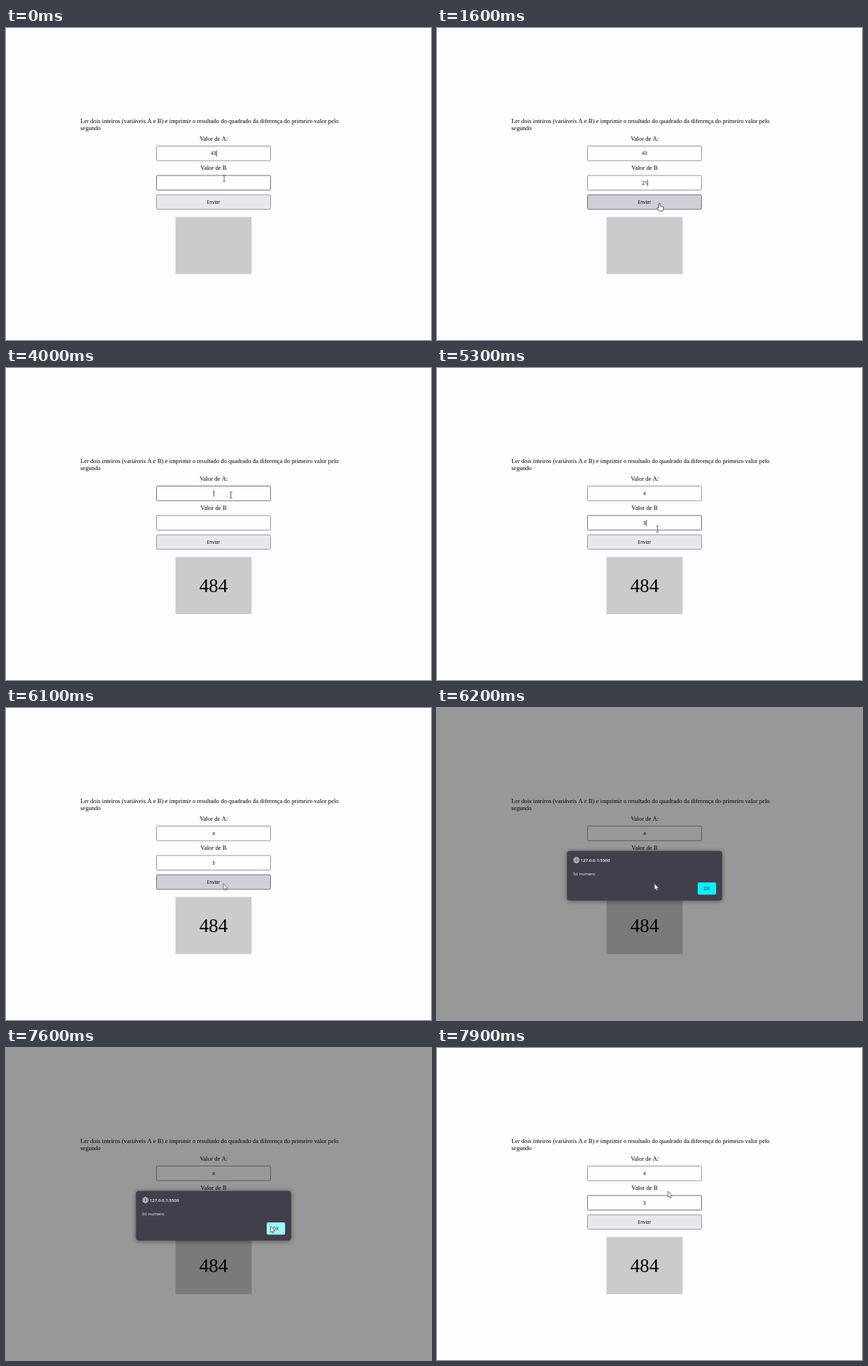
An HTML page with a canvas that plays this animation: 600 by 440 pixels, repeating every 8000 ms.

```html
<!DOCTYPE html>
<html lang="pt-BR">
<head>
<meta charset="utf-8">
<title>Quadrado da diferença</title>
<style>
html, body { margin: 0; width: 100%; height: 100%; overflow: hidden; background: #fdfcfe; }
canvas { display: block; width: 600px; height: 440px; }
</style>
</head>
<body>
<canvas id="stage" width="600" height="440"></canvas>
<script>
const ctx = document.getElementById('stage').getContext('2d');
const LOOP = 8000, STEP = 100;
const SERIF = '"Liberation Serif", serif';
const SANS = '"Open Sans", sans-serif';
const FIELD_A = 166, FIELD_B = 207.5, BUTTON = 234.7;

// Pointer stops: time, x, y
const path = [
  [0, 308, 212], [300, 311, 214], [800, 314, 219], [1100, 314, 219],
  [1400, 316, 257], [1600, 314, 247], [2800, 314, 247], [3300, 316, 214],
  [3500, 316, 214], [4000, 317.5, 179], [4400, 317.5, 179], [5000, 312, 219],
  [5200, 312, 219], [5500, 309, 250], [5700, 309, 248], [6000, 309, 248],
  [6100, 307, 247.7], [6600, 307, 247.7], [7500, 373.5, 251.5],
  [7600, 373.5, 251.5], [7900, 326, 202]
];

const within = (t, a, b) => t >= a && t < b;

// Last value whose start time has passed
function at(t, steps) {
  let value = '';
  for (const [start, v] of steps) if (t >= start) value = v;
  return value;
}

function pointer(t) {
  const i = path.findIndex(p => p[0] > t);
  if (i < 0) return path[path.length - 1].slice(1);
  const [t0, x0, y0] = path[i - 1], [t1, x1, y1] = path[i];
  const k = (t - t0) / (t1 - t0), e = k * k * (3 - 2 * k);
  return [x0 + (x1 - x0) * e, y0 + (y1 - y0) * e];
}

function text(str, x, y, size, family, color = '#000', align = 'center', weight = 400) {
  ctx.font = `${weight} ${size}px ${family}`;
  ctx.fillStyle = color;
  ctx.textAlign = align;
  ctx.fillText(str, x, y);
}

function box(x, y, w, h, r, fill, stroke) {
  ctx.beginPath();
  ctx.roundRect(x, y, w, h, r);
  ctx.fillStyle = fill;
  ctx.fill();
  if (stroke) {
    ctx.strokeStyle = stroke;
    ctx.lineWidth = 1;
    ctx.stroke();
  }
}

function control(y, fill, hover, radius) {
  box(212.5, y + .5, 161, 20.6, radius, fill, hover ? '#70707b' : '#9696a2');
}

function field(y, value, hover, caret) {
  control(y, '#fefeff', hover, 1);
  text(value, 293, y + 13.3, 6.7, SANS);
  if (caret) {
    const x = 293 + (value ? ctx.measureText(value).width / 2 : 0);
    ctx.fillStyle = '#222';
    ctx.fillRect(x, y + 6.4, .8, 9);
  }
}

function page(t, hover) {
  ctx.fillStyle = '#fdfcfe';
  ctx.fillRect(0, 0, 600, 440);
  text('Ler dois inteiros (variáveis A e B) e imprimir o resultado do quadrado da diferença do primeiro valor pelo',
    105, 133.8, 8.6, SERIF, '#000', 'left');
  text('segundo', 105, 143.6, 8.6, SERIF, '#000', 'left');
  text('Valor de A:', 293.3, 158.5, 8.6, SERIF);
  text('Valor de B', 293, 200.4, 8.6, SERIF);

  const a = at(t, [[0, '43'], [2100, ''], [4500, 'a']]);
  const b = at(t, [[400, '2'], [500, '21'], [2100, ''], [5100, '3']]);
  const caretA = t < 200 || within(t, 3900, 4400) || within(t, 4500, 4900);
  const caretB = within(t, 200, 1000) || within(t, 1500, 2000) || within(t, 4900, 5600);
  field(FIELD_A, a, hover === 'a', caretA);
  field(FIELD_B, b, hover === 'b', caretB);

  const pressed = t === 2000 || t === 6000;
  const over = hover === 'button';
  control(BUTTON, pressed ? '#b3b2ba' : over ? '#d0ced6' : '#e8e7ec', over, 2);
  text('Enviar', 293, 247.9, 6.5, SANS);

  ctx.fillStyle = '#cbcacd';
  ctx.fillRect(239.3, 266.6, 107.5, 80.5);
  if (t >= 2100) text('484', 293, 316.2, 26.8, SERIF);
}

function globe(x, y, r) {
  ctx.strokeStyle = '#f4f4f7';
  ctx.lineWidth = .75;
  ctx.beginPath();
  ctx.arc(x, y, r, 0, 7);
  ctx.moveTo(x + r * .45, y);
  ctx.ellipse(x, y, r * .45, r, 0, 0, 7);
  for (const d of [-1.3, 1.3]) {
    ctx.moveTo(x - r * .93, y + d);
    ctx.lineTo(x + r * .93, y + d);
  }
  ctx.stroke();
}

function dialog(t) {
  ctx.fillStyle = 'rgba(0,0,0,.4)';
  ctx.fillRect(0, 0, 600, 440);
  ctx.save();
  ctx.shadowColor = 'rgba(0,0,0,.45)';
  ctx.shadowBlur = 6;
  ctx.shadowOffsetY = 1;
  box(183.5, 201.5, 219, 70, 4, '#423f4c');
  ctx.restore();
  globe(196.8, 214.5, 3.8);
  text('127.0.0.1:5500', 202.8, 216.8, 6.1, SANS, '#fbfbfe', 'left', 600);
  text('Só numero', 192, 235.8, 6.15, SANS, '#fbfbfe', 'left');
  box(368, 246, 26, 17.2, 2, t >= 7500 ? '#a2f5fc' : '#0ceffa');
  text('OK', 381, 257, 6.3, SANS, '#2b2a33');
}

function outline(x, y, d, fill, stroke) {
  ctx.save();
  ctx.translate(x, y);
  const shape = new Path2D(d);
  ctx.lineWidth = .9;
  ctx.lineJoin = 'round';
  ctx.fillStyle = fill;
  ctx.strokeStyle = stroke;
  ctx.fill(shape);
  ctx.stroke(shape);
  ctx.restore();
}

function cursor(kind, x, y) {
  if (kind === 'beam') {
    outline(x, y, 'M-2 -4.3H-.5L0 -3.8L.5 -4.3H2M0 -3.8V3.8M-2 4.3H-.5L0 3.8L.5 4.3H2', 'transparent', '#55555b');
  } else if (kind === 'hand') {
    outline(x, y, 'M-1 1Q0 -.6 1 1V4.2Q2 3.5 2.7 4.5Q3.7 4 4.3 5Q5.6 4.8 5.6 6V8.2L4.6 11H-.6L-3.4 7.2Q-3.3 5.7 -1 7Z', '#fff', '#44434a');
  } else {
    outline(x, y, 'M0 0V8.6L2 6.9L3.3 9.7L4.6 9.1L3.4 6.4H6Z', '#fff', '#66656c');
  }
}

function hoverAt(t, x, y) {
  if (t >= 7900) return 'b';
  if (x < 212 || x > 374) return '';
  if (y >= FIELD_A && y <= 187) return 'a';
  if (y >= FIELD_B && y <= 229) return 'b';
  return y >= BUTTON && y <= 256 ? 'button' : '';
}

function draw(now) {
  const t = Math.floor((now % LOOP) / STEP) * STEP;
  const [x, y] = pointer(t);
  const open = within(t, 6200, 7700);
  const hover = open ? '' : hoverAt(t, x, y);
  page(t, hover);
  if (open) dialog(t);
  const kind = t >= 6100 ? 'arrow' : { a: 'beam', b: 'beam', button: 'hand' }[hover] || 'arrow';
  cursor(kind, x, y);
}

const start = performance.now();
function frame() {
  draw(performance.now() - start);
  requestAnimationFrame(frame);
}
frame();
</script>
</body>
</html>
```
